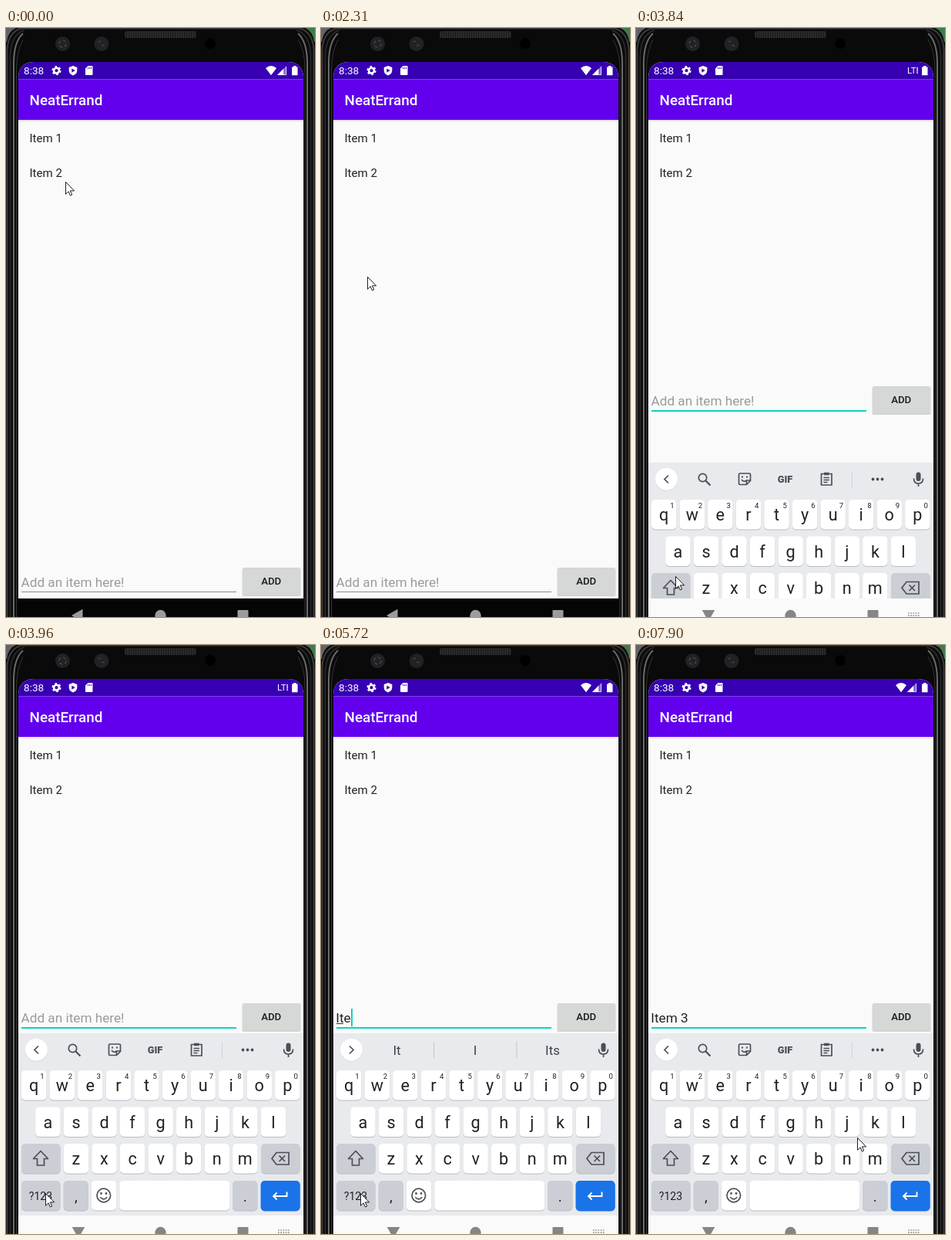
An HTML page for the animation above (8 s loop, 401 by 763 pixels).

```html
<!DOCTYPE html>
<html lang="en">
<head>
<meta charset="utf-8">
<title>To-do list demo</title>
<style>
  html, body { margin: 0; width: 100%; height: 100%; overflow: hidden; background: #0a0a0a; }
  svg { display: block; width: 401px; height: 763px; font-family: Roboto, sans-serif; }
  text { white-space: pre; }
  .mid { text-anchor: middle; }
  .line { fill: none; stroke: #4b4f54; stroke-width: 1.7; }
</style>
</head>
<body>
<svg id="stage" viewBox="0 0 401 763">
  <defs>
    <clipPath id="screen"><path d="M16 763V65Q16 44 37 44H365Q386 44 386 65V763Z"/></clipPath>
    <clipPath id="lteClip"><rect id="lteBox" y="44" width="14" height="22"/></clipPath>
    <linearGradient id="shade" x2="0" y2="1">
      <stop stop-color="#3a1a70" stop-opacity=".16"/><stop offset="1" stop-color="#3a1a70" stop-opacity="0"/>
    </linearGradient>
    <pattern id="mesh" width="3" height="3" patternUnits="userSpaceOnUse">
      <rect width="3" height="3" fill="#2c2c2c"/><rect width="1.2" height="3" fill="#1a1a1a"/>
    </pattern>
  </defs>

  <!-- phone body -->
  <rect width="401" height="763" fill="#0a0a0a"/>
  <path d="M0 0H13Q3 4 1 18H0Z" fill="#62646a"/>
  <path d="M401 0H388Q398 4 400 18H401Z" fill="#3f7a4c"/>
  <g fill="none">
    <path d="M1.500 763V28Q3 5 20 .5H381Q398 5 399.500 28V763" stroke="#3c3c3c" stroke-width="2"/>
    <path d="M5.500 763V36Q6 9 24 2.500M395.500 763V36Q395 9 377 2.500" stroke="#262626" stroke-width="2"/>
    <path d="M10 763V46Q10 18 22 7M391 763V46Q391 18 379 7" stroke="#6a6a6a" stroke-width="2"/>
    <path d="M13.500 763V54Q14 30 22 15M388 763V54Q388 30 379 15" stroke="#333"/>
  </g>
  <rect x="154" y="4" width="93" height="9" rx="3" fill="url(#mesh)"/>
  <g fill="#202225">
    <circle cx="73.500" cy="20.500" r="9.500"/><circle cx="124" cy="20.500" r="9.500"/>
    <g fill="none" stroke="#4c4f54" stroke-width="1.2">
      <circle cx="73.500" cy="20.500" r="4.500" stroke-dasharray="4 3"/>
      <path d="M120 18l3-1M124 22l4 1"/>
    </g>
    <circle cx="265" cy="20" r="7" fill="#000"/>
  </g>

  <g clip-path="url(#screen)">
    <rect x="16" y="44" width="370" height="719" fill="#fafafa"/>
    <rect x="16" y="119" width="370" height="3" fill="url(#shade)"/>
    <rect x="16" y="44" width="370" height="22.500" fill="#3700b3"/>
    <rect x="16" y="66.500" width="370" height="52.500" fill="#6200ee"/>

    <g fill="#fff">
      <text x="23" y="60" font-size="13.600">8:38</text>
      <circle cx="65.500" cy="55.200" r="3.400" fill="none" stroke="#fff" stroke-width="2.600"/>
      <circle cx="65.500" cy="55.200" r="5.200" fill="none" stroke="#fff" stroke-width="1.800" stroke-dasharray="2.72"/>
      <path d="M87 49l5.300 2v4q0 4.500-5.300 6.500q-5.300-2-5.300-6.500v-4Z"/>
      <path d="M85.300 52.400l4.400 2.700l-4.400 2.700Z" fill="#3700b3"/>
      <path d="M106.500 49h5q1 0 1 1v10q0 1-1 1h-7.500q-1 0-1-1v-7.500Z"/>
      <path d="M106.500 51v2M108.500 51v2M110.500 51v2" stroke="#3700b3" stroke-width=".9"/>
      <path id="wifi" d="M7 61.200L0 52q7-6 14 0Z"/>
      <g id="signal">
        <path d="M0 61L12 49V61Z" fill="#3700b3"/>
        <path d="M0 61L12 49V61Z" opacity=".4"/><path d="M0 61L8.200 52.800V61Z"/>
        <path d="M.8 60.600H11.600V50" fill="none" stroke="#fff" stroke-width=".7"/>
      </g>
      <text id="lte" y="59.300" font-size="11.500" clip-path="url(#lteClip)">LTE</text>
      <path d="M371 50.400h2v-1.400h3.500v1.400h2V61.300h-7.500Z"/>
      <text x="30.500" y="99.900" font-size="18.830" font-weight="500">NeatErrand</text>
    </g>

    <g font-size="15.060" fill="#222">
      <text x="30.500" y="147.700">Item 1</text><text x="30.500" y="193">Item 2</text>
    </g>

    <g id="form">
      <rect x="306.500" y="700" width="76" height="36" rx="2" fill="#000" opacity=".16"/>
      <rect x="307" y="699" width="75" height="35.500" rx="2" fill="#d6d7d7"/>
      <text class="mid" x="344.200" y="721.200" font-size="13.200" font-weight="500" fill="#1b1b1b">ADD</text>
      <g font-size="17.200">
        <text id="hint" x="19.500" y="723.800" fill="#9b9b9b">Add an item here!</text>
        <text id="entry" x="19.300" y="723.800" fill="#222"></text>
      </g>
      <rect id="compose" x="20" y="725" height="1" fill="#333"/>
      <rect id="rule" x="20" y="730" width="279"/>
      <rect id="caret" y="706" width="2" height="23" fill="#0bd2bf"/>
    </g>

    <g id="keys">
      <rect x="16" y="503" width="370" height="237" fill="#e8eaed"/>
      <circle cx="39.500" cy="525" r="14.500" fill="#000" opacity=".1"/>
      <circle cx="39.500" cy="524.300" r="14.400" fill="#fff"/>
      <path id="chevron" class="line"/>
      <g id="tools" class="line">
        <circle cx="86.500" cy="522.500" r="5.200"/><path d="M90.500 526.500l6 6" stroke-width="2.200"/>
        <path d="M135 517h12q1.500 0 1.500 1.500v8l-5 5h-8.500q-1.500 0-1.500-1.500v-11.500q0-1.500 1.500-1.500ZM148 526h-4.500v5M137 525q3 4 6 1"/>
        <path d="M137 521.500h2M143 521.500h2" stroke-width="2"/>
        <text class="mid" x="193.500" y="528.500" font-size="12.800" font-weight="900" fill="#4b4f54" stroke="none">GIF</text>
        <path d="M240.500 517.500h13.500v14.500h-13.500ZM243.500 522.500h7.500M243.500 525.500h7.500M243.500 528.500h5"/>
        <path d="M244 517.500h6.500" stroke-width="3.500"/>
        <path d="M280.500 514v21" style="stroke:#d0d3d7;stroke-width:1"/>
        <path d="M307.500 524.500h.01M313.500 524.500h.01M319.500 524.500h.01" stroke-width="3.800" stroke-linecap="round"/>
      </g>
      <g id="words" class="mid" font-size="16.950" fill="#3f4347">
        <text x="98.500" y="531"></text><text x="200" y="531"></text><text x="300.500" y="531"></text>
        <path d="M146.500 513.500v22M254 513.500v22" stroke="#c4c7cb"/>
      </g>
      <rect x="363.500" y="515.500" width="6" height="11.500" rx="3" fill="#4b4f54"/>
      <path class="line" d="M360.500 523.500q0 6.500 6 6.500t6-6.500M366.500 530v4"/>
      <g id="caps"></g>
      <path id="shift" d="M45 655.500l9.500 10h-5v8.500h-9v-8.500h-5Z" stroke="#4b4f54" stroke-width="1.700" stroke-linejoin="round"/>
      <path class="line" d="M351 657.500h16v15.500h-16l-6-7.750ZM354.500 661.500l7.500 7.500M362 661.500l-7.500 7.500"/>
      <circle class="line" cx="126.800" cy="713" r="8.800"/>
      <path class="line" d="M122.300 715.300q4.500 5 9 0"/>
      <path d="M123.500 710.500h.01M130 710.500h.01" class="line" stroke-linecap="round" style="stroke-width:2.800"/>
      <path d="M364.500 708.500v5.500h-17M351.500 709.500l-4.500 4.500l4.500 4.500" class="line" style="stroke:#fff;stroke-width:1.900"/>
    </g>

    <rect id="nav" x="16" y="739" width="370" height="24"/>
    <g id="navIcons">
      <path id="back" d="M-8.500 0L6-8.300V8.300Z"/>
      <circle cx="200.500" cy="761" r="7.200"/>
      <rect x="300.500" y="754" width="14" height="14" rx="1"/>
      <path id="ime" d="M353 758h15M353 761.200h15" fill="none" stroke-width="1.700" stroke-dasharray="1.700 1.500"/>
    </g>
  </g>

  <path id="mouse" d="M.5.500V16.300L4.100 12.800L6.400 18L8.700 17L6.400 11.900H11.600Z" fill="#fff" stroke="#111" stroke-width=".95"/>
</svg>
<script>
const LOOP = 8000;
const OFF = -50;
const el = id => document.getElementById(id);
const set = (id, attrs) => {
  for (const k in attrs) el(id).setAttribute(k, attrs[k]);
};
const show = (id, on) => set(id, { visibility: on ? 'visible' : 'hidden' });

// Value of the last step that has begun at time t.
const at = (steps, t) => {
  let v = steps[0].slice(1);
  for (const [start, ...rest] of steps) if (t >= start) v = rest;
  return v.length > 1 ? v : v[0];
};

const MOUSE = [[0, 77, 199], [140, 74, 194], [270, 72, 190], [410, 71, 190],
  [2310, 60, 322], [2430, 47, 520], [2550, 39, 655], [2700, 44, 680],
  [2820, 50, 697], [2970, 50, 706], [3100, 51, 710], [7900, 287, 638]];
const ENTRY = [[0, ''], [4980, 'I'], [5250, 'It'], [5720, 'Ite'],
  [6020, 'Item'], [6900, 'Item '], [7330, 'Item 3']];
const CARET = [[0, OFF], [3540, 19.5], [3840, OFF], [4550, 19.5], [4980, 24],
  [5250, 29], [5720, 39], [6020, 54], [6750, OFF], [6900, 58], [7330, 68], [7760, OFF]];
const COMPOSE = [[0, 0], [5400, 9], [6020, 18.5], [6170, 34], [7180, 0]];
const WORDS = [[0, ''], [5400, 'It', 'I', 'Its'], [6020, 'Ite', 'Item', 'Its'],
  [6170, 'Item', 'Items', 'Itemized'], [7180, 'is', 'and', 'for'], [7480, '']];
const WIFI = [[0, 337, 1], [3840, OFF, 0], [5130, 341, 0.35], [5250, 337, 1]];
const SIGNAL = [[0, 352], [3840, OFF], [4110, 353], [4260, 352], [4980, 348], [5250, 352]];
const LTE = [[0, OFF], [3840, 352], [4110, 336], [4260, 335], [4980, OFF]];
const KEYS_Y = [[0, 260], [3840, 60], [3960, 0]];

const key = (x, y, w, fill, edge = '#b9bcc1') =>
  `<rect x="${x}" y="${y + 1}" width="${w}" height="38.500" rx="5" fill="${edge}"/>` +
  `<rect x="${x}" y="${y}" width="${w}" height="38.500" rx="5" fill="${fill}"/>`;
const label = (x, y, size, s, cls = '') =>
  `<text class="mid ${cls}" x="${x}" y="${y}" font-size="${size}" fill="#202124">${s}</text>`;

function buildKeys() {
  const grey = '#cbced5', blue = '#1a73e8', pitch = 36.57;
  let out = '';
  [['qwertyuiop', 20, 551], ['asdfghjkl', 38.2, 598.5], ['zxcvbnm', 74.7, 646]].forEach(([row, x0, y], r) => {
    [...row].forEach((c, i) => {
      const x = x0 + pitch * i;
      out += key(x, y, 32.4, '#fff') + label(x + 16.2, y + 27.2, 21.6, c, 'letter');
      if (!r) out += label(x + 27, y + 10.6, 9.6, (i + 1) % 10);
    });
  });
  out += key(20, 646, 50.5, grey) + key(331, 646, 50.5, grey);
  out += key(20, 694, 50.5, grey) + key(74.7, 694, 32, grey) + key(110.8, 694, 32.4, '#fff');
  out += key(147.3, 694, 143, '#fff') + key(294, 694, 32.4, grey) + key(330.7, 694, 50.8, blue, blue);
  out += label(45, 718.5, 14.1, '?123') + label(90.8, 720.5, 19, ',') + label(310.3, 720.5, 19, '.');
  el('caps').innerHTML = out;
}
buildKeys();
const letters = [...document.querySelectorAll('.letter')];
const wordTexts = [...el('words').querySelectorAll('text')];

function draw(t) {
  const [mx, my] = at(MOUSE, t);
  set('mouse', { transform: `translate(${mx} ${my})` });

  // status bar
  const [wifiX, wifiAlpha] = at(WIFI, t);
  set('wifi', { transform: `translate(${wifiX} 0)`, opacity: wifiAlpha });
  set('signal', { transform: `translate(${at(SIGNAL, t)} 0)` });
  set('lte', { x: at(LTE, t) });
  set('lteBox', { x: at(LTE, t) });

  // entry field
  const open = t >= 3840, focus = t >= 3540, typed = at(ENTRY, t);
  set('form', { transform: `translate(0 ${open ? -235 : 0})` });
  show('hint', !typed);
  el('entry').textContent = typed;
  set('compose', { width: at(COMPOSE, t) });
  set('caret', { x: at(CARET, t) });
  set('rule', focus ? { height: 2, fill: '#0bd2bf' } : { height: 1, fill: '#8a8a8a' });

  // keyboard
  show('keys', open);
  set('keys', { transform: `translate(0 ${at(KEYS_Y, t)})` });
  const upper = t >= 5130 && t < 5250;
  letters.forEach(n => {
    n.textContent = upper ? n.textContent.toUpperCase() : n.textContent.toLowerCase();
  });
  set('shift', { fill: upper ? '#4b4f54' : 'none' });
  const words = at(WORDS, t);
  set('words', { display: words ? 'inline' : 'none' });
  set('tools', { display: words ? 'none' : 'inline' });
  set('chevron', { d: words ? 'M37 519.500l5 5l-5 5' : 'M42 519.500l-5 5l5 5' });
  wordTexts.forEach((n, i) => { n.textContent = words ? words[i] : ''; });

  // navigation bar
  const turning = t >= 3690;
  set('nav', { fill: open ? '#fafafa' : '#050505' });
  set('navIcons', { fill: open ? '#858585' : '#9c9c9c' });
  set('ime', { stroke: open ? '#959595' : '#8c8c8c' });
  show('ime', turning);
  set('back', {
    transform: open ? 'translate(94 760) rotate(-90)'
      : turning ? 'translate(95.500 759) rotate(-176)'
      : 'translate(93.500 761)'
  });
}

function tick() {
  draw(performance.now() % LOOP);
  requestAnimationFrame(tick);
}
tick();
</script>
</body>
</html>
```
